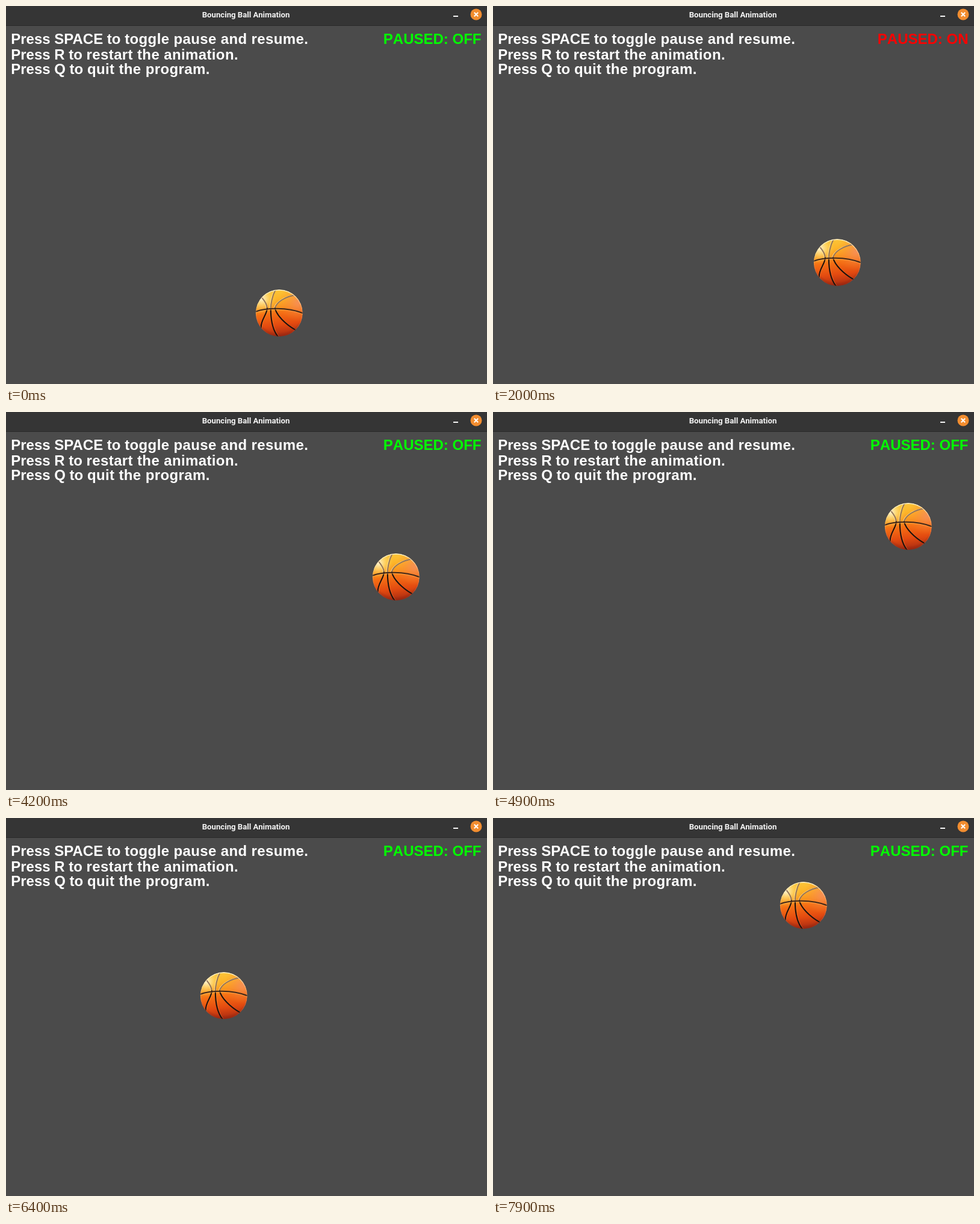
Recreate the animation shown at these times as an HTML page. Size 799x628 px, loop 8 s.

```html
<!DOCTYPE html>
<html lang="en">
<head>
<meta charset="utf-8">
<title>Bouncing Ball Animation</title>
<style>
  html, body { margin: 0; width: 100%; height: 100%; overflow: hidden; background: #4b4b4b; }
  svg { display: block; }
  text { white-space: pre; }
  .title { font: 700 13.2px Roboto, sans-serif; fill: #f4f4f4; text-anchor: middle; }
  .help { font: bold 24px "Liberation Sans", Arial, sans-serif; fill: #fff; font-kerning: normal; }
  .loose { letter-spacing: .38px; }
  .state { font: bold 24px "Liberation Sans", Arial, sans-serif; text-anchor: end; font-kerning: none; }
  .seam { fill: none; stroke-linecap: round; }
</style>
</head>
<body>
<svg width="799" height="628" viewBox="0 0 799 628">
  <defs>
    <linearGradient id="skin" x1=".42" y1="0" x2=".55" y2="1">
      <stop offset="0" stop-color="#fbc63a"/>
      <stop offset=".2" stop-color="#fdb428"/>
      <stop offset=".38" stop-color="#fa921f"/>
      <stop offset=".5" stop-color="#f56f14"/>
      <stop offset=".75" stop-color="#e34a10"/>
      <stop offset="1" stop-color="#a52a12"/>
    </linearGradient>
    <radialGradient id="shine" cx=".13" cy=".2" r=".32">
      <stop offset="0" stop-color="#fffbe8" stop-opacity=".9"/>
      <stop offset=".45" stop-color="#ffe68c" stop-opacity=".55"/>
      <stop offset="1" stop-color="#ffcc40" stop-opacity="0"/>
    </radialGradient>
    <radialGradient id="blush" cx=".9" cy=".28" r=".4">
      <stop offset="0" stop-color="#f58c62" stop-opacity=".8"/>
      <stop offset="1" stop-color="#f98a30" stop-opacity="0"/>
    </radialGradient>
    <radialGradient id="rim" cx=".5" cy=".4" r=".62">
      <stop offset=".82" stop-color="#7a1a0c" stop-opacity="0"/>
      <stop offset="1" stop-color="#7a1a0c" stop-opacity=".5"/>
    </radialGradient>
    <linearGradient id="edge" x1="0" y1="0" x2="0" y2="1">
      <stop offset="0" stop-color="#fff6d8" stop-opacity=".95"/>
      <stop offset=".45" stop-color="#ffdcb0" stop-opacity=".2"/>
      <stop offset="1" stop-color="#8c2a18" stop-opacity=".5"/>
    </linearGradient>
    <clipPath id="round"><circle r="39.1"/></clipPath>
    <g id="upper">
      <path d="M-6-39C-12-28-14-14-14-7"/>
      <path d="M-29-26C-24-20-20-14-20-8"/>
      <path d="M28-30C10-28-5-18-7-8"/>
    </g>
    <g id="lower">
      <path d="M-14-7C-14 10-11 28-2 39"/>
      <path d="M-20-8C-20 2-31 12-30 24"/>
      <path d="M-7-8C-4 4 10 18 27 28"/>
    </g>
    <path id="belt" d="M-39-2.5C-22-9 14-10 39 0"/>
  </defs>

  <rect width="799" height="628" fill="#4b4b4b"/>

  <g id="ball" clip-path="url(#round)">
    <circle r="39.1" fill="url(#skin)"/>
    <circle r="39.1" fill="url(#blush)"/>
    <circle r="39.1" fill="url(#shine)"/>
    <circle r="39.1" fill="url(#rim)"/>
    <g class="seam">
      <use href="#upper" x="-1.8" stroke="#ffe9a8" stroke-opacity=".6" stroke-width="1.2"/>
      <use href="#upper" stroke="#94755a" stroke-width="1.9"/>
      <use href="#lower" x="1.7" stroke="#ff9340" stroke-opacity=".4" stroke-width="1"/>
      <use href="#lower" stroke="#1d120d" stroke-width="2.1"/>
      <use href="#belt" y="1.9" stroke="#ffb050" stroke-opacity=".5" stroke-width="1.2"/>
      <use href="#belt" stroke="#40291a" stroke-width="2.2"/>
    </g>
    <circle r="38.5" fill="none" stroke="url(#edge)" stroke-width="1.4"/>
  </g>

  <g class="help">
    <text x="8.2" y="63">Press SPACE to <tspan class="loose">toggle pause and resume.</tspan></text>
    <text x="8.2" y="89">Press R to <tspan class="loose">restart the animation.</tspan></text>
    <text x="8.2" y="113">Press Q to <tspan class="loose">quit the program.</tspan></text>
  </g>
  <text id="state" class="state" x="789.5" y="63"></text>

  <rect width="799" height="32" fill="#353535"/>
  <rect y="32" width="799" height="1" fill="#292929"/>
  <text class="title" x="398.5" y="19">Bouncing Ball Animation</text>
  <rect x="743" y="16" width="8" height="2" fill="#f4f4f4"/>
  <circle cx="781" cy="14" r="9.5" fill="#f28d2f"/>
  <path d="M777.8 10.8l6.4 6.4m0-6.4l-6.4 6.4" stroke="#fff" stroke-width="2"/>
</svg>
<script>
  const LOOP = 8000, STEP = 100;
  const CENTER = { x: 39.8, y: 39.2 };

  // first step, left, top, then movement per step
  const legs = [
    [0, 414, 471, 6, 12],
    [7, 456, 539, 6, -12],
    [20, 532, 387, 0, 0],
    [30, 536, 379, 6, -12],
    [59, 232, 166, 18, 18],
    [76, 436, 56, 40 / 3, 50 / 3]
  ];
  const pause = { from: 20, to: 30 };

  const ball = document.getElementById('ball');
  const state = document.getElementById('state');
  const start = performance.now();

  function place(step) {
    const [first, x, y, dx, dy] = legs.findLast(leg => leg[0] <= step);
    const n = step - first;
    return [Math.round(x + n * dx) + CENTER.x, Math.round(y + n * dy) + CENTER.y];
  }

  function draw() {
    const time = (performance.now() - start) % LOOP;
    const step = Math.floor(time / STEP);
    const paused = step >= pause.from && step < pause.to;
    ball.setAttribute('transform', `translate(${place(step)})`);
    state.textContent = paused ? 'PAUSED: ON' : 'PAUSED: OFF';
    state.setAttribute('fill', paused ? '#f00' : '#0f0');
    requestAnimationFrame(draw);
  }
  draw();
</script>
</body>
</html>
```
